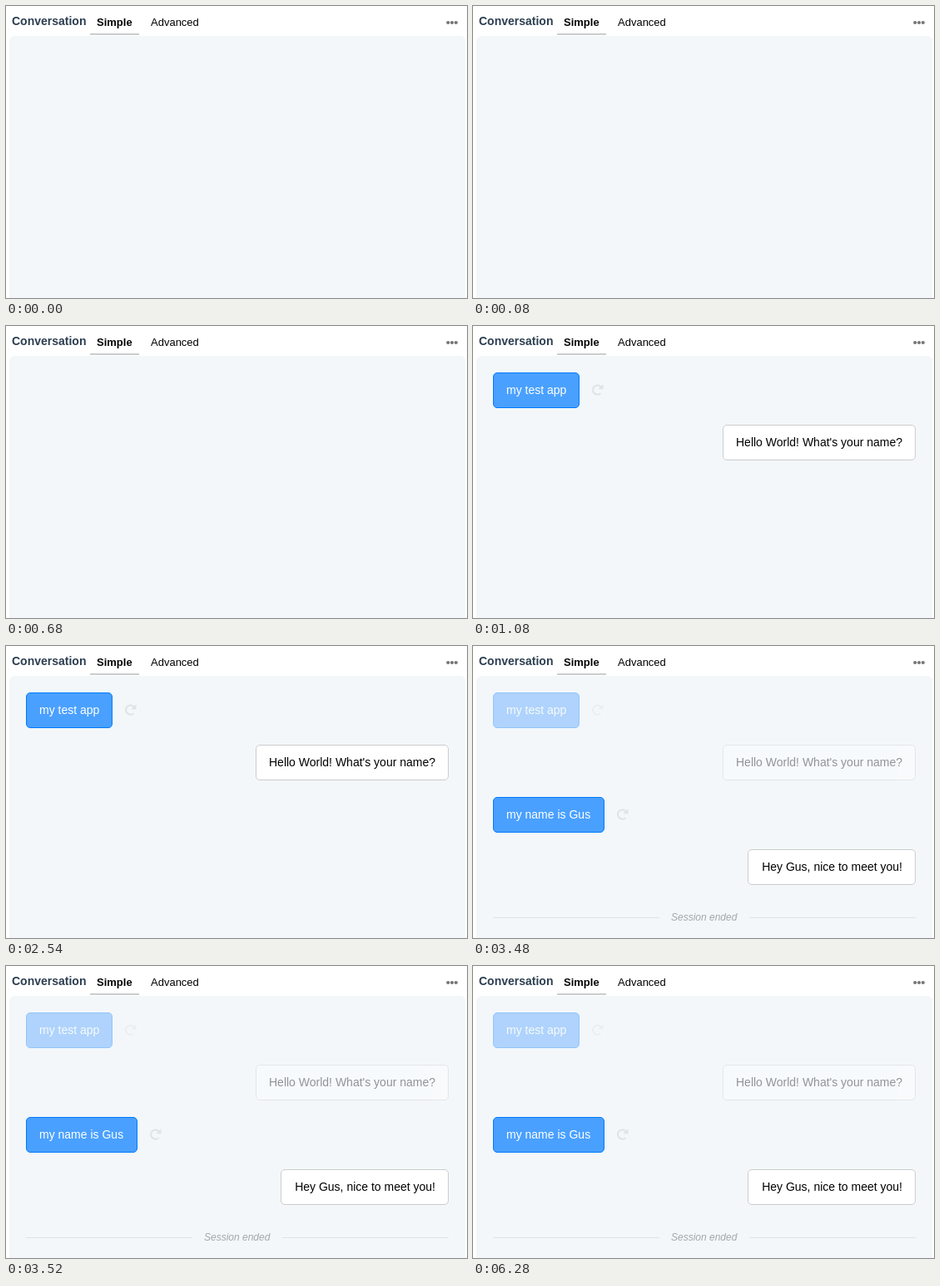
Write an HTML page that moves like this. It is 554 by 352 pixels and loops after 8.12 s.

```html
<!DOCTYPE html>
<html lang="en">
<head>
<meta charset="utf-8">
<title>Conversation</title>
<style>
  html, body { margin: 0; width: 100%; height: 100%; overflow: hidden; background: #fff; }
  body { position: relative; font: 14px/16px "Liberation Sans", Arial, sans-serif; color: #000; }
  body *, .panel { box-sizing: border-box; }
  .at { position: absolute; white-space: nowrap; }
  .title { left: 7px; top: 10px; font-weight: bold; color: #2c3e50; }
  .tab { top: 12px; font-size: 13px; line-height: 15px; }
  .active { left: 109px; font-weight: bold; }
  .underline { left: 101px; top: 33px; width: 59px; height: 2px; background: #ccc; }
  .panel { left: 4px; top: 36px; width: 548px; height: 330px; border-radius: 6px; background: #f3f7fa; }
  .bubble { height: 43px; padding: 12px 15px; border: 1px solid #ccc; border-radius: 5px; background: #fff; }
  .user { left: 24px; color: #fff; background: #4aa0ff; border-color: #007bff; }
  .bot { right: 22px; text-align: right; }
  .ended { left: 238px; top: 320px; font: italic 12px/14px "Liberation Sans", Arial, sans-serif; color: #a3a8ac; }
  .rule { top: 327px; width: 200px; height: 1px; background: #dfe3e6; }
  svg { position: absolute; overflow: visible; }
  .stage { position: absolute; top: 0; left: 0; width: 554px; height: 352px; }

  .first { animation: first 8120ms step-end infinite; }
  .second { animation: second 8120ms step-end infinite; }
  @keyframes first {
    0% { opacity: 0; }
    13.3% { opacity: 1; }
    42.857% { opacity: .4; }
  }
  @keyframes second {
    0% { opacity: 0; }
    42.857% { opacity: 1; }
  }
</style>
</head>
<body>
<div class="stage">
  <div class="at title">Conversation</div>
  <div class="at tab active">Simple</div>
  <div class="at underline"></div>
  <div class="at tab" style="left:174px">Advanced</div>
  <svg style="left:529px;top:17px" width="14" height="6" fill="#777">
    <circle cx="2.2" cy="3" r="2.1"/><circle cx="7" cy="3" r="2.1"/><circle cx="11.8" cy="3" r="2.1"/>
  </svg>
  <div class="at panel"></div>

  <div class="stage first">
    <div class="at bubble user" style="top:56px;width:104px">my test app</div>
    <svg style="left:142px;top:70px" width="15" height="14">
      <g id="redo">
        <path d="M12 3.6A5.6 5.6 0 1 0 11.4 11.2" fill="none" stroke="#dfe3e6" stroke-width="2"/>
        <path d="M14.5 .3V6.3H8.5Z" fill="#dfe3e6"/>
      </g>
    </svg>
    <div class="at bubble bot" style="top:119px;width:232px">Hello World! What's your name?</div>
  </div>

  <div class="stage second">
    <div class="at bubble user" style="top:182px;width:134px">my name is Gus</div>
    <svg style="left:172px;top:196px" width="15" height="14"><use href="#redo"/></svg>
    <div class="at bubble bot" style="top:245px;width:202px">Hey Gus, nice to meet you!</div>
    <div class="at rule" style="left:24px"></div>
    <div class="at ended">Session ended</div>
    <div class="at rule" style="left:332px"></div>
  </div>
</div>
</body>
</html>
```
